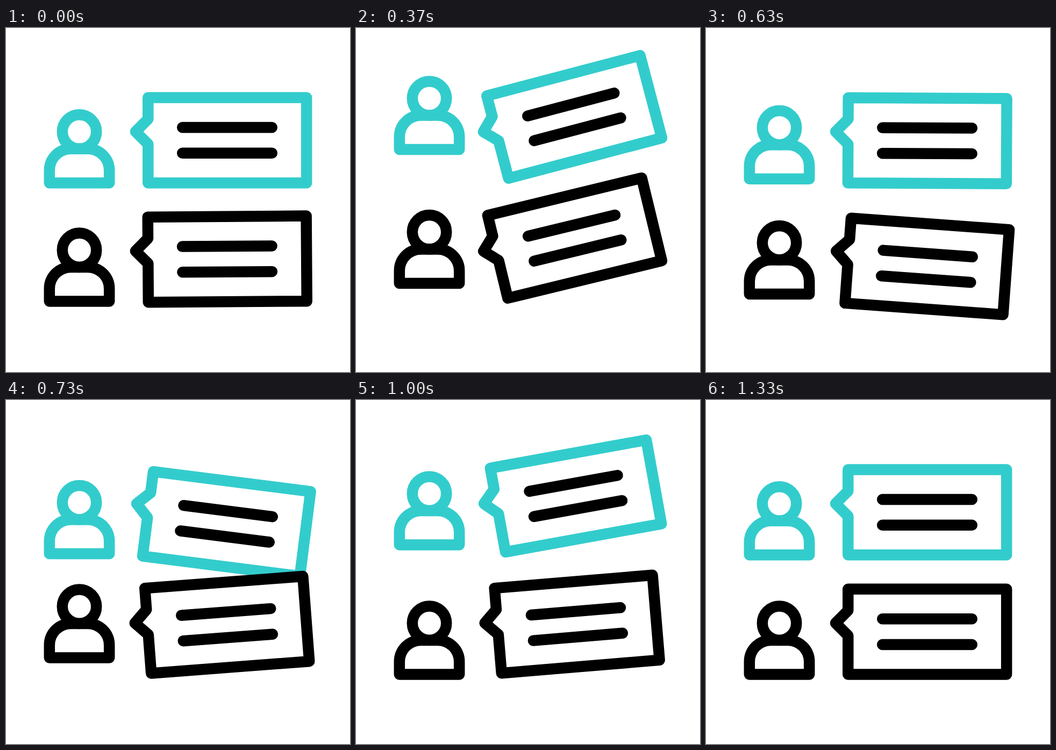
Write an HTML page without scripts that moves like this. It is 640 px wide and 640 px high and loops after 1.67 s.

```html
<!DOCTYPE html>
<html lang="en">
<head>
<meta charset="utf-8">
<title>Conversation</title>
<style>
  @property --tick { syntax: "<number>"; inherits: true; initial-value: 0; }

  html, body { margin: 0; width: 100%; height: 100%; overflow: hidden; background: #fff; }

  svg {
    display: block;
    width: 100%;
    height: 100%;
    fill: none;
    stroke-width: 20.5;
    stroke-linecap: round;
    stroke-linejoin: round;
    animation: tick 1670ms infinite;
  }

  /* 40 discrete ticks, then a rest */
  @keyframes tick {
    0% { --tick: 0; animation-timing-function: steps(40); }
    79.34%, 100% { --tick: 40; }
  }

  .first { --t: var(--tick); stroke: #3cc; }
  .second { --t: calc(var(--tick) + 5); stroke: #000; }
  .text { stroke: #000; }

  /* Four eased moves: start tick, length in ticks, change */
  .person {
    --a: 4.2;  --la: 7.5; --da: -63.7;
    --b: 11.7; --lb: 9.3; --db: 63.7;
    --c: 21;   --lc: 6;   --dc: -31;
    --d: 27;   --ld: 7;   --dd: 31;
  }
  .bubble {
    --a: 4.2;  --la: 8.8; --da: -17;
    --b: 14.3; --lb: 7.3; --db: 24.35;
    --c: 21.6; --lc: 8.9; --dc: -17.75;
    --d: 30.5; --ld: 8.5; --dd: 10.4;
  }

  .person, .bubble {
    --pa: clamp(0, (var(--t) - var(--a)) / var(--la), 1);
    --pb: clamp(0, (var(--t) - var(--b)) / var(--lb), 1);
    --pc: clamp(0, (var(--t) - var(--c)) / var(--lc), 1);
    --pd: clamp(0, (var(--t) - var(--d)) / var(--ld), 1);
    /* smoothstep of each progress, scaled and summed */
    --sum: (
      var(--da) * var(--pa) * var(--pa) * (3 - 2 * var(--pa)) +
      var(--db) * var(--pb) * var(--pb) * (3 - 2 * var(--pb)) +
      var(--dc) * var(--pc) * var(--pc) * (3 - 2 * var(--pc)) +
      var(--dd) * var(--pd) * var(--pd) * (3 - 2 * var(--pd))
    );
  }

  .person { transform: translateY(calc(var(--sum) * 1px)); }
  .bubble { transform: rotate(calc(var(--sum) * 1deg)); transform-origin: 241px 208.8px; }
</style>
</head>
<body>
<svg viewBox="0 0 640 640">
  <defs>
    <g id="person">
      <circle cx="136.5" cy="193" r="31.7"/>
      <path d="M80.8 288.2V264.7a40 40 0 0 1 40-40H152.2a40 40 0 0 1 40 40V288.2Z"/>
    </g>
    <path id="bubble" d="M264.3 129.6H559.2V288.2H264.3V216L241 192.7L264.3 169.4Z"/>
    <path id="text" d="M328.2 185H494.8M328.2 232.7H494.8"/>
  </defs>

  <g class="first">
    <g class="person"><use href="#person"/></g>
    <g class="bubble">
      <use href="#bubble"/>
      <use href="#text" class="text"/>
    </g>
  </g>

  <g class="second" transform="translate(0 222.2)">
    <g class="person"><use href="#person"/></g>
    <g class="bubble">
      <use href="#bubble"/>
      <use href="#text" class="text"/>
    </g>
  </g>
</svg>
</body>
</html>
```
